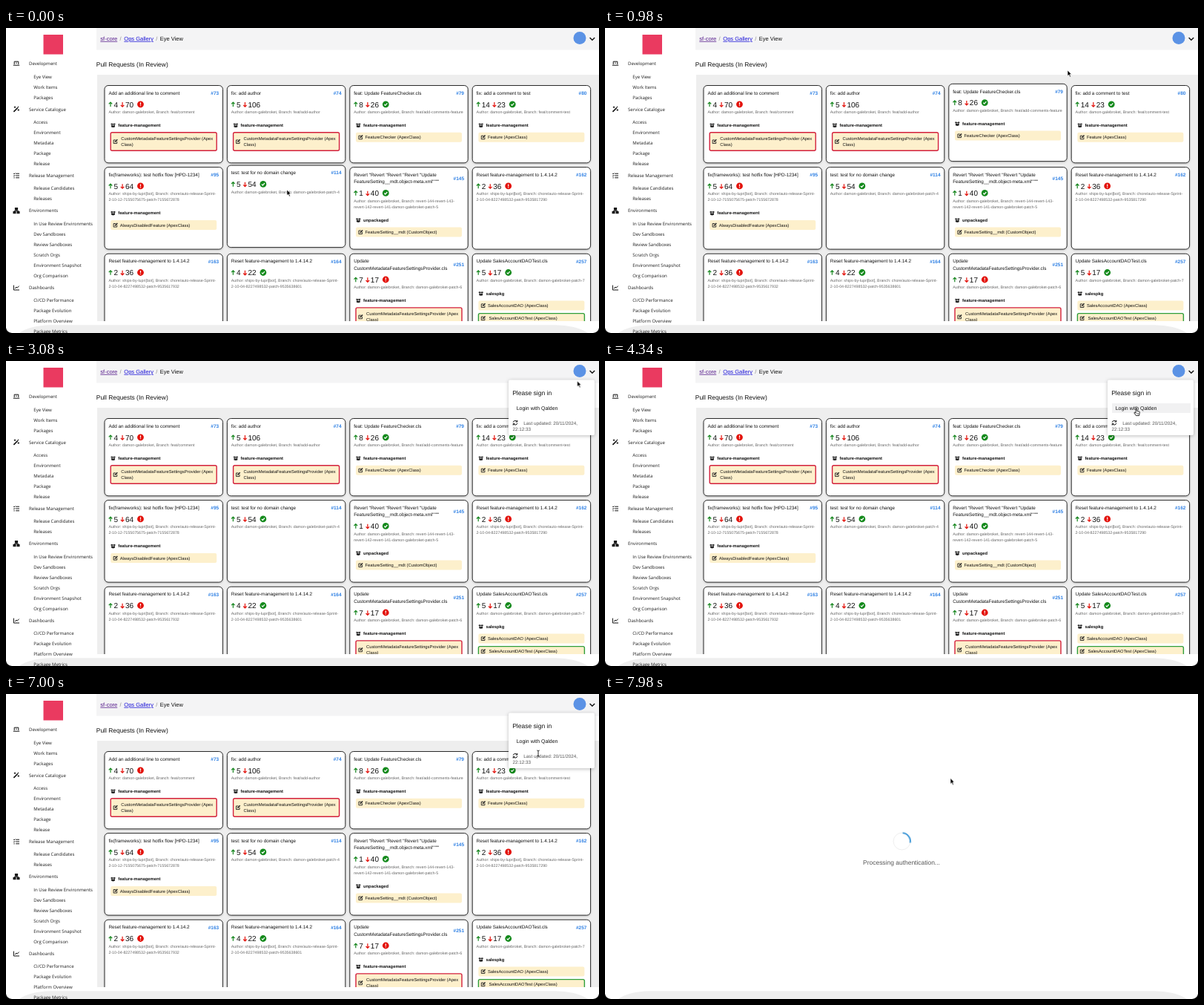
Recreate the animation shown at these times as an HTML page. Size 800 px wide and 411 px high, loop 8000 ms.

```html
<!DOCTYPE html>
<html lang="en">
<head>
<meta charset="utf-8">
<title>Pull Requests</title>
<style>
html, body { margin: 0; width: 100%; height: 100%; overflow: hidden; background: #fff; }
svg { display: block; width: 100%; height: 100%; }
text { font-family: "Liberation Sans", Arial, sans-serif; fill: #111; text-rendering: geometricPrecision; white-space: pre; }
.nav text { font-family: "Open Sans", "Noto Sans", sans-serif; fill: #1c1c1c; }
.ico { fill: none; stroke: #111; stroke-width: 1; }
.b { font-weight: bold; }
.u { text-decoration: underline; }
.frame { fill: #fff; stroke: #2b2b2b; stroke-width: 1; filter: drop-shadow(0 1px 1px #0003); }

.anim, .lift114, .lift74, .lift79 { animation: 8s linear infinite; }
.lift114 { animation-name: lift114; }
.lift74 { animation-name: lift74; }
.lift79 { animation-name: lift79; }
#pointer { animation-name: travel; }
#arrow { animation-name: arrow; }
#beam { animation-name: beam; }
#hand { animation-name: hand; }
#menu { animation-name: menu; }
#row { animation-name: row; }
#auth { animation-name: auth; }
#arrow, #beam, #hand, #menu, #row, #auth { animation-timing-function: step-end; }
#arc { animation: spin 1s linear infinite; transform-origin: 400.5px 198.5px; }

@keyframes lift114 { 0%, 1.75% { transform: translateY(-2.5px); } 4.4%, 100% { transform: none; } }
@keyframes lift74 {
  0%, 2.6% { transform: none; } 5%, 6.1% { transform: translateY(-2.5px); }
  7% { transform: translateY(-2px); } 9%, 100% { transform: none; }
}
@keyframes lift79 {
  0%, 7% { transform: none; } 9%, 11.4% { transform: translateY(-2.5px); }
  12.25% { transform: translateY(-2.2px); } 14.5%, 100% { transform: none; }
}
@keyframes travel {
  0% { transform: translate(379px, 218px); animation-timing-function: steps(5); }
  4.375% { transform: translate(440px, 140px); animation-timing-function: steps(2); }
  6.125% { transform: translate(462px, 121px); animation-timing-function: step-end; }
  7% { transform: translate(492.5px, 104px); animation-timing-function: steps(4); }
  10.5% { transform: translate(545px, 88px); animation-timing-function: steps(2); }
  12.25% { transform: translate(624px, 57px); animation-timing-function: steps(8); }
  19.25% { transform: translate(783px, 20px); animation-timing-function: step-end; }
  21.875% { transform: translate(786px, 16px); animation-timing-function: step-end; }
  26.25%, 36.75% { transform: translate(788.5px, 14.5px); animation-timing-function: steps(8); }
  43.75% { transform: translate(717px, 64px); animation-timing-function: step-end; }
  87.5% { transform: translate(718px, 80px); animation-timing-function: steps(7); }
  93.625%, 100% { transform: translate(466px, 113.5px); }
}
@keyframes arrow {
  0%, 8.75%, 37.625%, 88.375%, 100% { opacity: 1; }
  6.125%, 18.375%, 42% { opacity: 0; }
}
@keyframes beam { 0%, 8.75%, 88.375%, 100% { opacity: 0; } 6.125%, 87.5% { opacity: 1; } }
@keyframes hand { 0%, 37.625%, 87.5%, 100% { opacity: 0; } 18.375%, 42% { opacity: 1; } }
@keyframes menu { 0% { opacity: 0; } 30.625%, 100% { opacity: 1; } }
@keyframes row { 0%, 87.5%, 100% { opacity: 0; } 42% { opacity: 1; } }
@keyframes auth { 0% { opacity: 0; } 98.875%, 100% { opacity: 1; } }
@keyframes spin { to { transform: rotate(360deg); } }
</style>
</head>
<body>
<svg id="stage" viewBox="0 0 800 411" preserveAspectRatio="none"></svg>
<script>
// y is the middle of the line, not its baseline
const text = (x, y, size, str, attrs = '') =>
  `<text x="${x}" y="${y + size * 0.36}" font-size="${size}" ${attrs}>${str}</text>`;
const rect = (x, y, w, h, attrs) => `<rect x="${x}" y="${y}" width="${w}" height="${h}" ${attrs}/>`;
const path = (d, attrs = '') => `<path d="${d}" ${attrs}/>`;
const at = (x, y, body, attrs = '') => `<g transform="translate(${x} ${y})" ${attrs}>${body}</g>`;

const ICONS = {
  laptop: path('M-2.8 1V-2.8H2.8V1M-4.2 2.2H4.2M-.8 -.8H.8'),
  wand: path('M-3.6 3.4L2 -2.2', 'stroke-width="1.6"') + path('M2.8 -.2V2.2M1.6 1H4M-2 -4V-1.6M-3.2 -2.8H-.8M2.4 -4V-2.4'),
  list: path('M-.8 -2.8H4M-.8 0H4M-.8 2.8H4M-3.8 -2.8L-3 -2L-1.8 -3.6M-3.8 0L-3 .8L-1.8 -.8M-3.6 2.8H-2.2'),
  tree: rect(-1.6, -3.8, 3.2, 2.6, 'fill="#111"') + rect(-4, 1, 3, 2.4, 'fill="#111"') +
    rect(1, 1, 3, 2.4, 'fill="#111"') + path('M0 -1V0M-2.5 1V0H2.5V1'),
  chart: path('M-3.6 -3.4V3H4M-2 1L0 -1L1.2 .2L3.6 -2.4')
};

const NAV = [
  ['laptop', 'Development', 48, 65.5, ['Eye View', 'Work Items', 'Packages']],
  ['wand', 'Service Catalogue', 109.5, 127, ['Access', 'Environment', 'Metadata', 'Package', 'Release']],
  ['list', 'Release Management', 199, 216, ['Release Candidates', 'Releases']],
  ['tree', 'Environments', 246.3, 264, ['In Use Review Environments', 'Dev Sandboxes', 'Review Sandboxes',
    'Scratch Orgs', 'Environment Snapshot', 'Org Comparison']],
  ['chart', 'Dashboards', 350, 367, ['CI/CD Performance', 'Package Evolution', 'Platform Overview', 'Package Metrics']]
];

const nav = () => NAV.map(([icon, head, y, first, items]) =>
  at(14, y, ICONS[icon], 'class="ico"') + text(31, y, 6.07, head) +
  items.map((s, i) => text(37.3, first + 14.05 * i, 6.07, s)).join('')).join('');

const USER = 'Author: damon-galebroket, Branch: ';
const BOT = 'Author: ships-by-lupri[bot], Branch: chore/auto-release-Sprint-';
const FM = 'feature-management';
const PROVIDER = ['CustomMetadataFeatureSettingsProvider (Apex', 'Class)'];
const RED = '#d3203c', GREEN = '#2f9e3a';

// title lines, number, added, removed, passed, author lines, package, items as [lines, border]
const CARDS = [
  [['Add an additional line to comment'], 73, 4, 70, false, [USER + 'feat/comment'], FM, [[PROVIDER, RED]]],
  [['fix: add author'], 74, 5, 106, null, [USER + 'feat/add-author'], FM, [[PROVIDER, RED]]],
  [['feat: Update FeatureChecker.cls'], 79, 8, 26, true, [USER + 'feat/add-comments-feature'], FM, [[['FeatureChecker (ApexClass)']]]],
  [['fix: add a comment to test'], 80, 14, 23, true, [USER + 'feat/comment-test'], FM, [[['Feature (ApexClass)']]]],
  [['fix(frameworks): test hotfix flow [HPD-1234]'], 95, 5, 64, false, [BOT, '2-10-12-7155075675-patch-7155672878'], FM,
    [[['AlwaysDisabledFeature (ApexClass)']]]],
  [['test: test for no domain change'], 114, 5, 54, true, [USER + 'damon-galebroket-patch-4']],
  [['Revert "Revert "Revert "Revert "Update', 'FeatureSetting__mdt.object-meta.xml""""'], 145, 1, 40, true,
    [USER + 'revert-144-revert-143-', 'revert-142-revert-141-damon-galebroket-patch-5'], 'unpackaged',
    [[['FeatureSetting__mdt (CustomObject)']]]],
  [['Reset feature-management to 1.4.14.2'], 162, 2, 36, false, [BOT, '2-10-04-8227498532-patch-9535817290']],
  [['Reset feature-management to 1.4.14.2'], 163, 2, 36, false, [BOT, '2-10-04-8227498532-patch-9535617932']],
  [['Reset feature-management to 1.4.14.2'], 164, 4, 22, true, [BOT, '2-10-04-8227498532-patch-9535638601']],
  [['Update', 'CustomMetadataFeatureSettingsProvider.cls'], 251, 7, 17, false, [USER + 'damon-galebroket-patch-6'], FM, [[PROVIDER, RED]]],
  [['Update SalesAccountDAOTest.cls'], 257, 5, 17, true, [USER + 'damon-galebroket-patch-7'], 'salespkg',
    [[['SalesAccountDAO (ApexClass)']], [['SalesAccountDAOTest (ApexClass)'], GREEN]]]
];

const change = (x, y, dir, color) =>
  at(x, y, path(`M0 ${3 * dir}V${-3 * dir}M-2.3 ${-0.7 * dir}L0 ${-3 * dir}L2.3 ${-0.7 * dir}`,
    `fill="none" stroke="${color}" stroke-width="1.2"`));

const status = (x, y, ok) => at(x, y,
  `<circle r="4.4" fill="${ok ? '#148a1c' : '#e3120b'}"/>` +
  path(ok ? 'M-2 .1L-.6 1.6L2.1 -1.4' : 'M0 -2.5V.6M0 1.4V2.5', 'fill="none" stroke="#fff" stroke-width="1.2"'));

const crate = (x, y) => at(x, y,
  path('M-2.4 -.4L0 .4L2.4 -.4V2.4L0 3L-2.4 2.4ZM-2.6 -2.6L0 -2L2.6 -2.6L3.2 -1L.8 -.4L0 -1.4L-.8 -.4L-3.2 -1Z', 'fill="#222"'));

const pencil = (x, y) => at(x, y,
  path('M.4 -2H-2.6V2.6H2V0', 'fill="none" stroke="#222" stroke-width=".9"') +
  path('M-.8 .9L2.6 -2.6', 'stroke="#222" stroke-width="1.5"'));

function item(x, y, [lines, border]) {
  const h = lines.length > 1 ? 24.5 : 13;
  const tx = x + (border ? 14 : 12.5);
  const edge = border ? `stroke="${border}" stroke-width="1.4"` : '';
  return rect(x, y, 143, h, `rx="2" fill="#fdf0cc" ${edge}`) + pencil(x + 6.5, y + h / 2) +
    lines.map((s, i) => text(tx, y + (h > 13 ? 8 : 6.6) + 8.2 * i, 5.83, s)).join('');
}

function card([title, num, add, del, ok, author, pkg, items = []], i) {
  const x = 133 + 165.4 * (i % 4), row = Math.floor(i / 4);
  const top = [77.5, 187.6, 304.2][row], h = [104.3, 110.5, 110][row];
  const digit = 5.56, n1 = String(add).length * digit, n2 = String(del).length * digit;
  let y = top + 10;
  let out = rect(x, top, 159.4, h, 'rx="5" class="frame"');
  out += text(x + 154.2, y + (title.length - 1) * 4.75, 6.5, '#' + num, 'class="b" text-anchor="end" style="fill:#2f80e4"');
  title.forEach((s, k) => out += text(x + 5.4, y + 9.5 * k, 6.36, s));
  y += 9.5 * (title.length - 1) + 15.6;
  const x2 = x + 18.5 + n1;
  out += change(x + 8, y, 1, '#16861e') + text(x + 12.5, y, 10, add);
  out += change(x2, y, -1, '#e3120b') + text(x2 + 4, y, 10, del);
  if (ok !== null) out += status(x2 + n2 + 13.3, y - 0.3, ok);
  y += 10;
  author.forEach((s, k) => out += text(x + 5.4, y + 8.2 * k, 5.3, s, 'style="fill:#666"'));
  y += 8.2 * (author.length - 1) + 18;
  if (pkg) out += crate(x + 11.5, y) + text(x + 18.2, y, 5.83, pkg, 'class="b"');
  items.forEach((it, k) => out += item(x + 8.2, y + 9.6 + 17.2 * k, it));
  return `<g class="lift${num}">${out}</g>`;
}

const bottom = path('M18 411Q32 401 60 400.3H742Q770 401 785 411Z', 'fill="#eeeeee"');
const corners = path('M0 404Q1 410 8 411H0ZM800 404Q799 410 792 411H800Z', 'fill="#000"');

const header = rect(122, 0, 678, 29.5, 'fill="#f4f4f5"') +
  text(127.3, 14.2, 7.5, 'sf-core', 'class="u" style="fill:#551a8b"') +
  text(153.5, 14.2, 7.5, '/', 'style="fill:#888"') +
  text(159.3, 14.2, 7.5, 'Ops Gallery', 'class="u" style="fill:#1a12d8"') +
  text(202.3, 14.2, 7.5, '/', 'style="fill:#888"') +
  text(207.8, 14.2, 7.5, 'Eye View') +
  '<circle cx="774" cy="13.5" r="8.5" fill="#5b92e5"/>' +
  path('M787.6 13L790.9 16.2L794.2 13', 'fill="none" stroke="#111" stroke-width="1.4"');

const menu = rect(678, 25.5, 116, 74.5, 'rx="2" fill="#fff" style="filter:drop-shadow(0 1px 2.5px #0004)"') +
  rect(684, 57, 106, 13, 'id="row" class="anim" fill="#f1f1f2"') +
  text(683.2, 43.2, 8.5, 'Please sign in') +
  text(688.7, 63.2, 6.97, 'Login with Qalden') +
  at(687, 83.2, path('M-2.8 -.6A2.9 2.9 0 0 1 2.4 -1.6M2.8 -3.4V-1.2H.6M2.8 .6A2.9 2.9 0 0 1 -2.4 1.6M-2.8 3.4V1.2H-.6'), 'class="ico"') +
  text(698.3, 83.5, 6.3, 'Last updated: 20/11/2024,', 'style="fill:#555"') +
  text(683.5, 91.3, 6.3, '22:12:33', 'style="fill:#555"');

// spinner arc spans 12 to 107 degrees clockwise from the top
const rim = deg => {
  const a = deg * Math.PI / 180;
  return `${400.5 + 11.4 * Math.sin(a)} ${198.5 - 11.4 * Math.cos(a)}`;
};
const auth = rect(0, 0, 800, 411, 'fill="#fff"') + bottom + corners +
  '<circle cx="400.5" cy="198.5" r="11.4" fill="none" stroke="#efefef"/>' +
  path(`M${rim(12)}A11.4 11.4 0 0 1 ${rim(107)}`, 'id="arc" fill="none" stroke="#3794d6" stroke-width="1.9"') +
  text(400, 227, 8.46, 'Processing authentication...', 'text-anchor="middle" style="fill:#555"');

const pointer =
  `<g id="arrow" class="anim">${path('M0 0V7.6L1.8 6L3.1 9L4.4 8.4L3.1 5.5H5.4Z', 'fill="#000" stroke="#fff" stroke-width=".6"')}</g>` +
  `<g id="beam" class="anim">${path('M-1.7 -4Q0 -4 0 -3V3Q0 4 -1.7 4M1.7 -4Q0 -4 0 -3M0 3Q0 4 1.7 4', 'fill="none" stroke="#111" stroke-width=".9"')}</g>` +
  `<g id="hand" class="anim">${path('M-.9 .5Q0 -.6 .8 .5V3.4L3.6 4Q4.4 4.2 4.3 5.2L3.6 9.6H-.6L-3 6.2Q-3.4 5 -2.2 5.2L-.9 6.2Z', 'fill="#fff" stroke="#111" stroke-width=".9"')}${path('M.9 6V8M2.3 6V8', 'stroke="#111" stroke-width=".5"')}</g>`;

document.getElementById('stage').innerHTML =
  '<clipPath id="view"><rect x="123" y="63" width="677" height="332"/></clipPath>' +
  rect(0, 0, 800, 411, 'fill="#fff"') + bottom +
  rect(50.5, 9, 26.5, 26.5, 'fill="#ea3a60"') +
  `<g class="nav">${nav()}</g>` + header +
  text(121.8, 48.7, 8.43, 'Pull Requests (In Review)') +
  `<g clip-path="url(#view)">${rect(123, 63, 677, 332, 'fill="#eeeeee"')}${CARDS.map(card).join('')}</g>` +
  corners +
  `<g id="menu" class="anim">${menu}</g>` +
  `<g id="auth" class="anim">${auth}</g>` +
  `<g id="pointer" class="anim">${pointer}</g>`;
</script>
</body>
</html>
```
